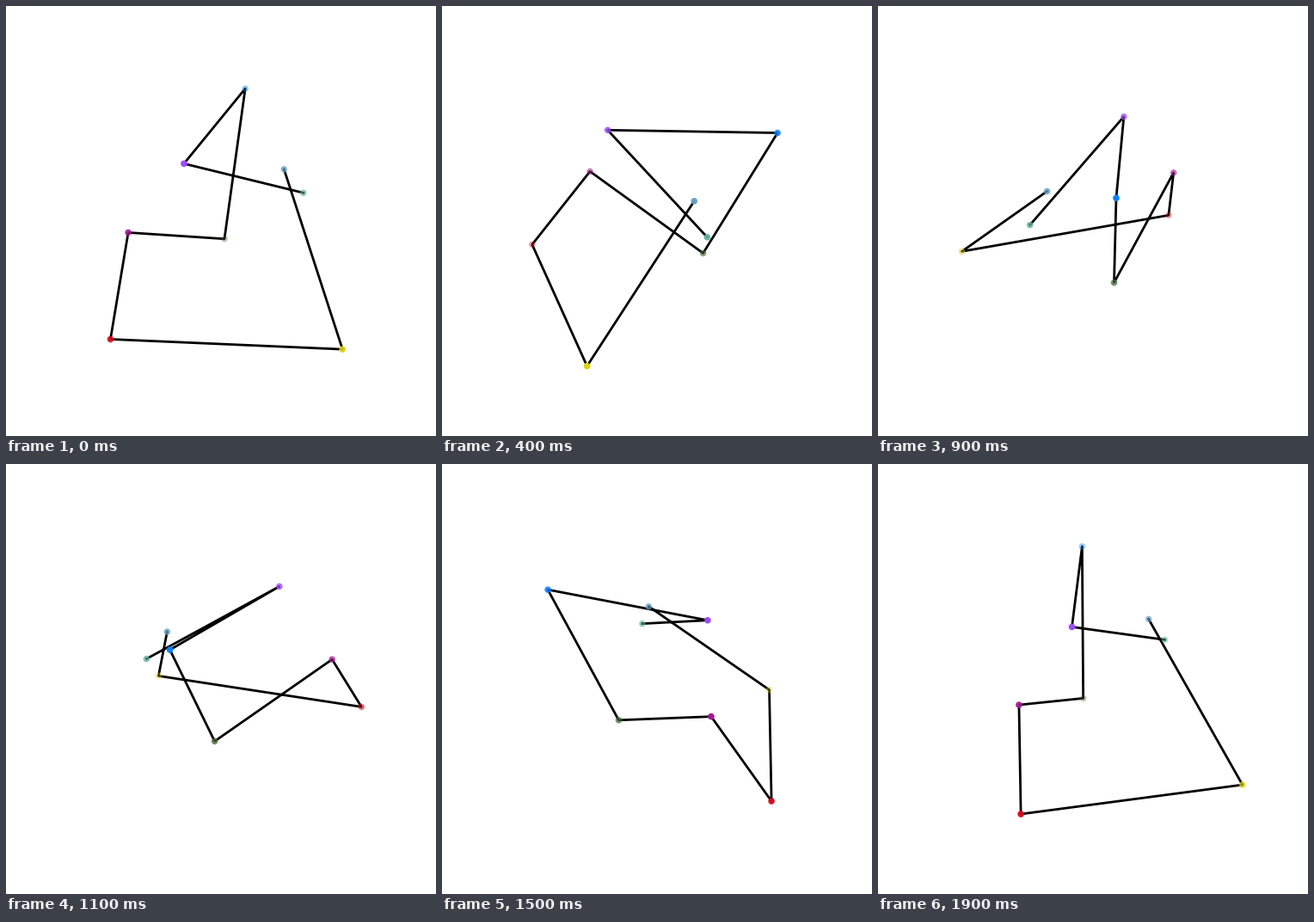
These frames come from a looping animation (500 by 500 pixels, 2 s). A matplotlib script:

```python
import numpy as np
import matplotlib.pyplot as plt
from matplotlib.animation import FuncAnimation

SIZE, FRAMES, INTERVAL = 500, 20, 100
CENTER = 256.3, 244.0
UNIT, VIEW_DIST = 270.27, 10
ELEV = np.radians(30)
BOX = 0.975 * np.array([1, 1, 0.75])

# each vertex is a colour (red, green, blue as shares of their range) placed in a colour cube
PALETTE = np.array([
    (0.409, 0.841, 0.587),
    (0.693, 0.319, 0.991),
    (0.000, 0.585, 1.000),
    (0.305, 0.491, 0.189),
    (0.707, 0.075, 0.548),
    (0.969, 0.000, 0.042),
    (1.000, 1.000, 0.000),
    (0.439, 0.753, 0.768),
])
DARKEST = np.array([12, 12, 18]) / 255
BRIGHTEST = np.array([222, 210, 253]) / 255

colors = DARKEST + PALETTE * (BRIGHTEST - DARKEST)
points = (PALETTE - 0.5) * BOX


def project(frame):
    """Screen positions and perspective scale after turning about the vertical axis."""
    turn = 2 * np.pi * frame / FRAMES
    y, x, z = points.T
    side = x * np.cos(turn) - y * np.sin(turn)
    front = x * np.sin(turn) + y * np.cos(turn)
    depth = front * np.cos(ELEV) + z * np.sin(ELEV)
    up = z * np.cos(ELEV) - front * np.sin(ELEV)
    scale = 1 / (1 - depth / VIEW_DIST)
    offset = UNIT * scale * np.array([side, -up])
    return offset.T + CENTER, scale


fig = plt.figure(figsize=(SIZE / 100, SIZE / 100), dpi=100, facecolor="white")
ax = fig.add_axes([0, 0, 1, 1])
ax.set(xlim=(0, SIZE), ylim=(SIZE, 0))
ax.axis("off")
line, = ax.plot([], [], color="black", lw=2, zorder=1)
dots = ax.scatter(*project(0)[0].T, s=20, c=colors, linewidths=1, zorder=2)


def draw(frame):
    xy, scale = project(frame)
    line.set_data(*xy.T)
    # nearer dots are more opaque and painted last
    alpha = 0.3 + 0.7 * (scale - scale.min()) / np.ptp(scale)
    order = np.argsort(scale)
    rgba = np.column_stack([colors, alpha])[order]
    dots.set_offsets(xy[order])
    dots.set_facecolor(rgba)
    dots.set_edgecolor(rgba)
    return line, dots


anim = FuncAnimation(fig, draw, frames=FRAMES, interval=INTERVAL,
                     init_func=lambda: draw(0), repeat=True, repeat_delay=0)
plt.show()
```
